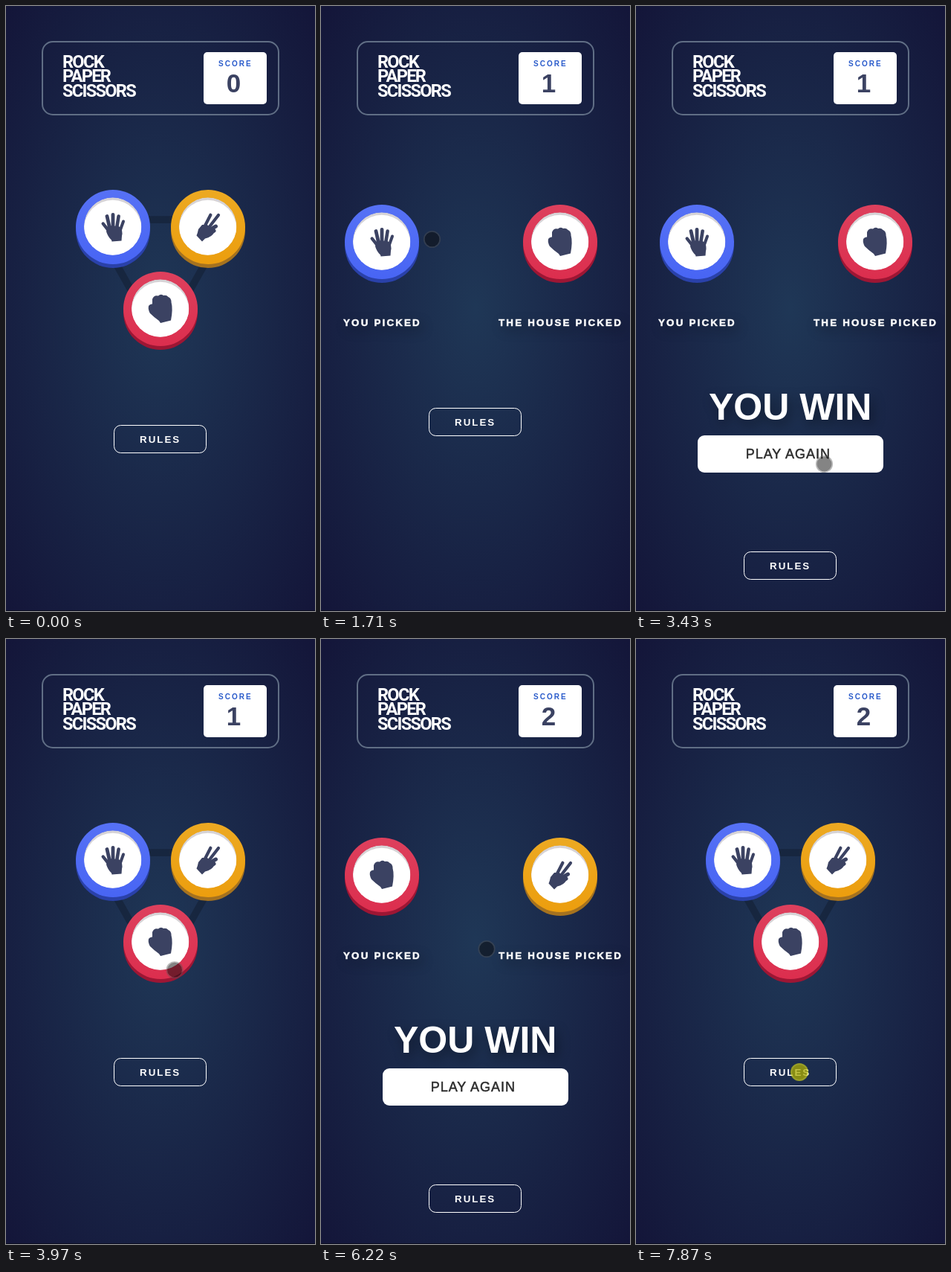
Recreate the animation shown at these times as an HTML page. Size 416 by 813 pixels, loop 8000 ms.

```html
<!DOCTYPE html>
<html lang="en">
<head>
<meta charset="utf-8">
<title>Rock Paper Scissors</title>
<style>
  html, body { margin: 0; width: 100%; height: 100%; overflow: hidden; }
  body { background: radial-gradient(hsl(214,47%,23%), hsl(237,49%,15%)); }
  svg { display: block; width: 416px; height: 813px; }
  text { font-family: "Liberation Sans", Arial, sans-serif; font-weight: 700; fill: #fff; }
  .title text { font: 700 23.6px Roboto, sans-serif; font-stretch: 75%; }
  .small { font-size: 10px; letter-spacing: 2px; fill: #2a5bcb; }
  .score { font-size: 35px; fill: #3b4262; text-anchor: middle; }
  .rules text { font-size: 13.33px; letter-spacing: 2px; }
  .label { font-size: 13.33px; letter-spacing: 2.2px; stroke: #fff; stroke-width: .5; }
  .label, .win { filter: drop-shadow(4px 6px 8px rgba(0,0,0,.4)); }
  .win { font-size: 50px; }
  .again { font-size: 18px; font-weight: 400; letter-spacing: 1px; fill: #2b2b2b; stroke: #2b2b2b; stroke-width: .5; }
</style>
</head>
<body>
<svg viewBox="0 0 416 813" xmlns="http://www.w3.org/2000/svg">
  <defs id="defs"><clipPath id="face"><circle cx="-.3" cy="-1" r="38.7"/></clipPath></defs>
  <rect y="812" width="416" height="1" fill="#0b0d20"/>
  <rect x="49" y="48" width="318" height="98" rx="14" fill="none" stroke="#606e85" stroke-width="2"/>
  <g class="title">
    <text x="76" y="82.5">ROCK</text>
    <text x="76" y="102">PAPER</text>
    <text x="76" y="121.5">SCISSORS</text>
  </g>
  <rect x="266" y="62" width="85" height="70" rx="5" fill="#fff"/>
  <text class="small" x="286" y="81">SCORE</text>
  <text class="score" id="score" x="306.5" y="115.5">0</text>

  <g id="home">
    <path d="M114.7 287H301.3L208 452Z" fill="none" stroke="#000" stroke-opacity=".22" stroke-width="9.75"/>
  </g>
  <g id="duel">
    <text class="label" x="30" y="430">YOU PICKED</text>
    <text class="label" id="houseLabel" x="239" y="430">THE HOUSE PICKED</text>
    <circle id="empty" cx="322" cy="312" r="45" fill="#000" fill-opacity=".2"/>
  </g>
  <g id="result">
    <text class="win" x="98" y="556">YOU WIN</text>
    <rect x="83" y="577" width="250" height="50" rx="9" fill="#fff"/>
    <text class="again" x="147.7" y="608">PLAY AGAIN</text>
  </g>
  <g class="rules" id="rules">
    <rect x="145.5" y=".5" width="124" height="37" rx="9" fill="none" stroke="#fff"/>
    <text x="180" y="24">RULES</text>
  </g>
  <g id="touch">
    <circle r="10" fill="#0a0a0a" fill-opacity=".5"/>
    <circle r="10.7" fill="none" stroke="#555" stroke-opacity=".4" stroke-width="1.8"/>
    <circle id="press" r="12" fill="#ff0" fill-opacity=".5"/>
  </g>
  <path id="arrow" d="M0 0V16.5L3.8 13L6.4 19L9 17.9L6.5 12H11.8Z" fill="#fff" stroke="#000"/>
</svg>
<script>
const $ = id => document.getElementById(id);
const show = (id, on) => { $(id).style.display = on ? '' : 'none'; };
const finger = (x1, y1, x2, y2, w) => `<path d="M${x1} ${y1}L${x2} ${y2}" stroke-width="${w}"/>`;

const kinds = {
  paper: {
    top: '#5671f5', low: '#4865f4', edge: '#2a41a9',
    icon: finger(-13.3, -4.5, -5, 6, 4.4) + finger(-8, -14.5, -4.5, 1, 4.8) + finger(0, -16.5, 0, 0, 4.8) +
      finger(7.6, -14.5, 5, 2, 4.6) + finger(14, -7.5, 9.5, 5, 4) +
      '<path d="M-7-2L8-1L12 4Q13 9 12 12L11.5 18.5L-1.5 19.5L-2 17.5Q-7 13-9 6Z"/>'
  },
  scissors: {
    top: '#eca922', low: '#ec9e0e', edge: '#a5721f',
    icon: finger(-6, 2, 3.4, -16.2, 4.2) + finger(0, 2, 14, -16, 4.2) +
      finger(2, 4, 10.5, -1, 5) + finger(3, 8, 8, 5, 5) +
      '<path d="M-8-3L-1-3L4 2L9 6Q5 14-4 15.5L-8 19.5L-15.5 11.5Q-14 8-13 3Z"/>'
  },
  rock: {
    top: '#dd405d', low: '#dc2e4e', edge: '#9d1634',
    icon: '<path d="M-11-13Q-9-19-3-17.5Q0-20.5 4-18Q8-19 10.5-16Q14.5-14.5 14.5-9Q17 0 14 15.5L0 19L-2 16Q-9 11-14 6Q-17 1-16-4Q-14-7-11-6.5Z"/>'
  }
};

function token(kind, x, y) {
  const k = kinds[kind];
  return `<g transform="translate(${x} ${y})">
    <circle cy="5" r="50" fill="${k.edge}"/><circle r="50" fill="url(#${kind})"/>
    <g clip-path="url(#face)"><circle cx="-.3" cy="-1" r="38.7" fill="#d6d3d6"/>
    <circle cx="-.3" cy="2.5" r="38.7" fill="#fff"/></g>
    <g fill="#3b4262" stroke="#3b4262" stroke-width="0" stroke-linecap="round">${k.icon}</g></g>`;
}

for (const [id, k] of Object.entries(kinds))
  $('defs').insertAdjacentHTML('beforeend', `<linearGradient id="${id}" x2="0" y2="1">
    <stop stop-color="${k.top}"/><stop offset="1" stop-color="${k.low}"/></linearGradient>`);

const add = (id, html) => $(id).insertAdjacentHTML('beforeend', html);
add('home', token('paper', 144, 297) + token('scissors', 272, 297) + token('rock', 208, 407));
add('duel', ['paper', 'rock'].map(k => `<g id="you-${k}">${token(k, 82, 317)}</g>`).join('') +
  ['rock', 'scissors'].map(k => `<g id="house-${k}">${token(k, 322, 317)}</g>`).join(''));

// Tighten the title only where no condensed face is available
const title = [...document.querySelectorAll('.title text')];
const extra = title[2].getComputedTextLength() - 98;
if (extra > 3) title.forEach(e => { e.style.letterSpacing = -extra / 8 + 'px'; });

// Pointer moves: start, end, number of steps, from, to
const moves = [
  [140, 760, 8, [355, 745], [155.5, 310]],
  [1230, 1230, 1, [155.5, 310], [149.5, 313.5]],
  [2470, 3030, 7, [149.5, 313.5], [247, 608]],
  [3260, 3260, 1, [247, 608], [253.5, 615.5]],
  [3500, 4050, 7, [253.5, 615.5], [220.5, 402.5]],
  [6140, 6620, 6, [220.5, 402.5], [254.5, 592.5]],
  [7320, 7320, 1, [254.5, 592.5], [257, 591.5]],
  [7414, 7870, 6, [257, 591.5], [220, 582]]
];
const presses = [[1080, 1170], [3350, 3430], [4140, 4220], [6850, 6930], [7870, 8000]];
const arrows = [[1170, 1230], [4220, 4290]];
const within = (list, t) => list.some(([a, b]) => t >= a && t < b);

function pointer(t) {
  const m = moves.filter(m => t >= m[0]).pop();
  if (!m) return null;
  const [a, b, n, from, to] = m;
  const p = t >= b ? 1 : Math.floor((t - a) / (b - a) * n) / n;
  const e = p * p * (3 - 2 * p);
  return from.map((v, i) => v + (to[i] - v) * e);
}

function draw(t) {
  const round = t < 3500 ? 1 : 2;
  const [start, reveal, win, end] = round === 1 ? [1230, 1710, 2470, 3500] : [4290, 4750, 5460, 7000];
  const duel = t >= start && t < end;
  const shown = t >= reveal, won = duel && t >= win;
  show('home', !duel);
  show('duel', duel);
  show('result', won);
  show('empty', !shown);
  show('you-paper', round === 1);
  show('you-rock', round === 2);
  show('house-rock', shown && round === 1);
  show('house-scissors', shown && round === 2);
  $('houseLabel').setAttribute('y', shown ? 430 : 420);
  $('score').textContent = t < start ? round - 1 : round;
  $('rules').setAttribute('transform', `translate(0 ${won ? 733 : duel ? 540 : 563})`);

  const pos = pointer(t), arrow = within(arrows, t);
  show('touch', pos && !arrow);
  show('arrow', pos && arrow);
  show('press', within(presses, t));
  if (pos) {
    $('touch').setAttribute('transform', `translate(${pos})`);
    $('arrow').setAttribute('transform', `translate(${pos[0] - 1} ${pos[1] - .5})`);
  }
}

const t0 = performance.now();
function frame() {
  draw((performance.now() - t0) % 8000);
  requestAnimationFrame(frame);
}
frame();
</script>
</body>
</html>
```
